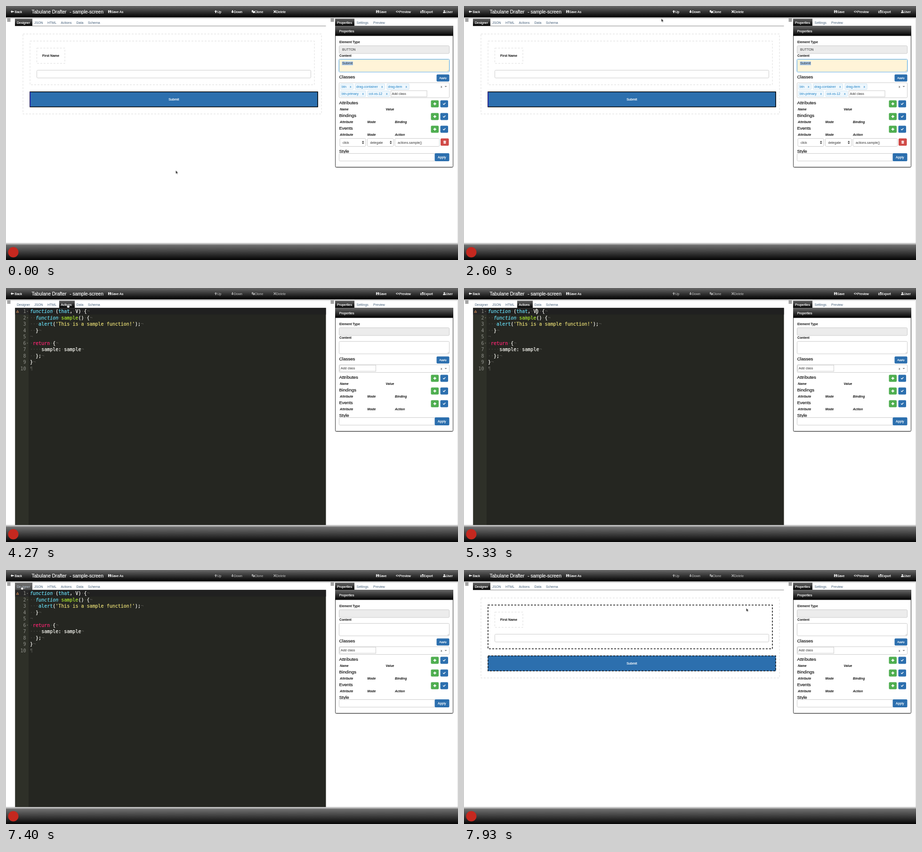
These frames come from a looping animation (960 px wide and 540 px high, 8000 ms). An HTML page:

```html
<!DOCTYPE html>
<html lang="en">
<head>
<meta charset="utf-8">
<title>Screen designer</title>
<style>
html, body { margin: 0; width: 100%; height: 100%; overflow: hidden; background: #fff; }
svg { display: block; position: absolute; left: 0; top: 0; }
text { font: 7px "Liberation Sans", Arial, sans-serif; fill: #333; white-space: pre; }
.light { fill: #fff; stroke: #fff; stroke-width: .2px; }
.link { fill: #46607a; }
.bold { font-weight: bold; fill: #111; }
.col { font-weight: bold; font-style: italic; font-size: 6.8px; fill: #111; }
.head { font-size: 9.5px; fill: #111; stroke: #111; stroke-width: .2px; }
.tag { fill: #1a7fc4; font-size: 7.1px; }
.field { fill: #fff; stroke: #ccc; }
.dash { fill: none; stroke: #dcdcdc; stroke-dasharray: 4 3; }
.dark { fill: none; stroke: #111; stroke-width: 1.5px; stroke-dasharray: 4 3; }
.code { --ink: #f8f8f2; }
.code text { font: 10px "DejaVu Sans Mono", monospace; }
.code text, .code tspan { fill: var(--ink); stroke: var(--ink); stroke-width: .25px; }
.code .num { --ink: #8f908a; stroke: none; }
.code .dim { --ink: #52524d; font-style: normal; stroke: none; }
.code .key { --ink: #66d9ef; font-style: italic; }
.code .fn { --ink: #66d9ef; }
.code .name { --ink: #a6e22e; }
.code .str { --ink: #e6db74; }
.code .ret { --ink: #f92672; }

/* One loop is 8 s, so 1% is 80 ms */
.step { animation: 8s step-end infinite; }
.before { animation-name: before; }
.after { animation-name: after; }
.designer { animation-name: designer; }
.editor { animation-name: editor; }
.last { animation-name: last; }
.tab-designer { animation-name: tab-designer; }
.tab-actions { animation-name: tab-actions; }
.tools { animation-name: tools; }
.picked { animation-name: picked; }
.hover-inner { animation-name: hover-inner; }
.hover-outer { animation-name: hover-outer; }
.hover-actions { animation-name: hover-actions; }
.hover-designer { animation-name: hover-designer; }
.caret { animation-name: caret; }
.arrow { animation-name: arrow; }
.beam { animation-name: beam; }
.hand { animation-name: hand; }
.mouse { animation: mouse 8s linear infinite; }

@keyframes before { 0% { opacity: 1 } 53.375%, 100% { opacity: 0 } }
@keyframes after { 0% { opacity: 0 } 53.375%, 100% { opacity: 1 } }
@keyframes designer { 0%, 93.375%, 100% { opacity: 1 } 53.375% { opacity: 0 } }
@keyframes editor { 0%, 93.375%, 100% { opacity: 0 } 53.375% { opacity: 1 } }
@keyframes last { 0% { opacity: 0 } 93.375%, 100% { opacity: 1 } }
@keyframes tab-designer { 0%, 93.375%, 100% { opacity: 1 } 53.375% { opacity: 0 } 91.625% { opacity: .5 } }
@keyframes tab-actions { 0%, 91.625%, 100% { opacity: 0 } 53.375% { opacity: 1 } }
@keyframes tools { 0% { opacity: 1 } 53.375%, 100% { opacity: .55 } }
@keyframes picked { 0% { opacity: 1 } 38.375%, 100% { opacity: 0 } }
@keyframes hover-inner { 0%, 29.9% { opacity: 0 } 23.75%, 98.4%, 100% { opacity: 1 } }
@keyframes hover-outer { 0%, 30.6%, 98.4%, 100% { opacity: 0 } 29.9%, 97.1% { opacity: 1 } }
@keyframes hover-actions { 0%, 53.375%, 100% { opacity: 0 } 43.5% { opacity: 1 } }
@keyframes hover-designer { 0%, 93.375%, 100% { opacity: 0 } 89.5% { opacity: 1 } }
@keyframes caret {
  0%, 60.375%, 72.875%, 85.375%, 100% { opacity: 0 }
  54.125%, 66.625%, 79.125% { opacity: 1 }
}
@keyframes arrow { 0%, 20.4%, 95.3%, 100% { opacity: 1 } 10.8%, 43.5% { opacity: 0 } }
@keyframes beam { 0%, 20.4%, 89.5%, 100% { opacity: 0 } 10.8%, 59.5% { opacity: 1 } }
@keyframes hand { 0%, 59.5%, 95.3%, 100% { opacity: 0 } 43.5%, 89.5% { opacity: 1 } }
@keyframes mouse {
  0%, 2.8% { transform: translate(360.5px, 349.5px); animation-timing-function: ease-in-out }
  11.6%, 12.6% { transform: translate(846px, 296px) }
  17.5%, 20% { transform: translate(872px, 296px); animation-timing-function: ease-in-out }
  24.1%, 26.9% { transform: translate(640px, 130px) }
  32.5% { transform: translate(419.5px, 26.5px) }
  37.5% { transform: translate(250px, 30px); animation-timing-function: ease-out }
  44.1%, 45.6% { transform: translate(139px, 37px) }
  49.1%, 57.5% { transform: translate(131px, 36px) }
  66.6%, 68.1% { transform: translate(131px, 63px) }
  75.9%, 77.5% { transform: translate(150px, 64px) }
  79.1%, 80.6% { transform: translate(160px, 76px) }
  90.9%, 95% { transform: translate(33px, 36px) }
  99.1%, 100% { transform: translate(599.5px, 81px) }
}
</style>
</head>
<body>
<svg id="stage" width="960" height="540" xmlns="http://www.w3.org/2000/svg"></svg>
<script>
const BLUE = '#2c6fae', GREEN = '#4fae50', RED = '#d04a47';

const ICONS = {
  back: 'M0 3L3 0V2H6.5V4H3V6Z',
  up: 'M3 0L6 3H4V6H2V3H0Z',
  down: 'M3 6L0 3H2V0H4V3H6Z',
  save: 'M0 0H5L6 1V6H0ZM1.5 .6V2H4V.6ZM1.3 3.5V5.5H4.7V3.5Z',
  clone: 'M0 0H3V1.4H2V4.5H0ZM2.5 1.8H6V6H2.5Z',
  cross: 'M1 0L3 2 5 0 6 1 4 3 6 5 5 6 3 4 1 6 0 5 2 3 0 1Z',
  eye: 'M0 3Q3.3 -.8 6.6 3Q3.3 6.8 0 3ZM3.3 1.5a1.5 1.5 0 1 0 .01 0Z',
  out: 'M0 1.5H2V2.3H1V5.2H5V4H6V6H0ZM3 0H6.3V3.3L5.2 2.2 3 4.4 2 3.4 4.1 1.1Z',
  user: 'M3 0a1.5 1.7 0 1 1 -.01 0ZM0 6Q0 3.6 2 3.5L3 4 4 3.5Q6 3.6 6 6Z',
  plus: 'M2 0H4V2H6V4H4V6H2V4H0V2H2Z',
  check: 'M0 3.2L1 2.2 2.3 3.4 5 .6 6 1.6 2.3 5.4Z',
  trash: 'M0 .6H2V0H4V.6H6V1.4H0ZM.6 1.8H5.4V6.6H.6ZM1.7 2.5V6H2.2V2.5ZM3.8 2.5V6H4.3V2.5Z'
};

const text = (x, y, s, cls = '', more = '') => `<text x="${x}" y="${y}" class="${cls}" ${more}>${s}</text>`;
const box = (x, y, x2, y2, more = '') => `<rect x="${x}" y="${y}" width="${x2 - x}" height="${y2 - y}" ${more}/>`;
const field = (x, y, x2, y2, more = '') => box(x, y, x2, y2, `rx="2" class="field" ${more}`);
const icon = (name, x, y, fill = '#fff') =>
  `<path d="${ICONS[name]}" transform="translate(${x} ${y})" fill="${fill}" fill-rule="evenodd"/>`;
const group = (cls, ...parts) => `<g class="${cls}">${parts.join('')}</g>`;
const step = (cls, ...parts) => group('step ' + cls, ...parts);
const shift = (dy, s) => `<g transform="translate(0 ${dy})">${s}</g>`;
const tool = (name, x, label, tx) => icon(name, x, 9) + text(tx, 14.5, label, 'light');
const button = (x, y, x2, y2, fill, mark) =>
  box(x, y, x2, y2, `rx="2" fill="${fill}"`) + icon(mark, (x + x2) / 2 - 3, (y + y2) / 2 - 3);
const grip = x => [26.5, 28.4, 30.3, 32.2].map(y => box(x, y, x + 7, y + 1, 'fill="#555"')).join('');
const tab = (x, x2, tx, label) => box(x, 27, x2, 42, 'fill="url(#bar)"') + text(tx, 37.5, label, 'light');
const down = (x, y) => `<path d="M${x} ${y}h5l-2.5 2.8z" fill="#888"/>`;

function defs() {
  const ramp = (id, ...stops) => `<linearGradient id="${id}" x2="0" y2="1">` +
    stops.map(([at, c, o = 1]) => `<stop offset="${at}" stop-color="${c}" stop-opacity="${o}"/>`).join('') +
    '</linearGradient>';
  return '<defs>' + ramp('bar', [0, '#686868'], [1, '#000']) +
    ramp('foot', [0, '#707070'], [1, '#050505']) +
    ramp('over', [0, '#7c7c7c'], [1, '#999']) +
    ramp('rise', [0, '#777', 0], [1, '#777', .9]) +
    ramp('fall', [0, '#777', .6], [1, '#777', 0]) + '</defs>';
}

function toolbar() {
  return box(0, 24, 960, 28, 'fill="url(#fall)"') + box(0, 0, 960, 24, 'fill="url(#bar)"') +
    box(959, 28, 960, 504, 'fill="#ddd"') +
    tool('back', 10, 'Back', 18.5) +
    text(54.5, 15.5, 'Tabulane Drafter', 'light', 'style="font-size:10px"') +
    text(207, 15.5, '- sample-screen', 'light', 'style="font-size:10px" text-anchor="end"') +
    tool('save', 217, 'Save As', 223.5) +
    step('tools', tool('up', 442.5, 'Up', 448.5), tool('down', 478, 'Down', 484),
      tool('clone', 522, 'Clone', 528), tool('cross', 568, 'Delete', 574)) +
    tool('save', 786, 'Save', 792.5) + tool('eye', 828, 'Preview', 835) +
    tool('out', 880, 'Export', 886.5) + tool('user', 928, 'User', 934);
}

function tabs() {
  const names = [[23, 'Designer'], [60, 'JSON'], [88, 'HTML'], [116.5, 'Actions'], [149.5, 'Data'], [174, 'Schema']];
  return grip(2.5) + grip(689.5) +
    box(19, 42, 679.5, 43, 'fill="#888"') +
    step('hover-actions', box(113, 27, 146, 42, 'fill="url(#over)"')) +
    step('hover-designer', box(19, 27, 56, 42, 'fill="url(#over)"')) +
    names.map(([x, s]) => text(x, 37.5, s, 'link')).join('') +
    step('tab-designer', tab(19, 56, 23, 'Designer')) +
    step('tab-actions', tab(113, 146, 116.5, 'Actions'));
}

function designer() {
  const dashed = (cls, ...r) => box(...r, `class="${cls}"`);
  const outer = [36, 59.5, 670, 229.5], inner = [51, 74.5, 655, 167.5], submit = [51, 182.5, 662, 214.5];
  return step('designer',
    dashed('dash', ...outer), dashed('dash', ...inner), dashed('dash', 65.5, 89.5, 125, 122),
    step('hover-outer', dashed('dark', ...outer)),
    step('hover-inner', dashed('dark', ...inner)),
    text(77, 108, 'First Name', 'bold'),
    field(65.5, 136.5, 647.5, 153),
    box(50.5, 182, 662.5, 215, `rx="1" fill="${BLUE}"`),
    step('before', box(...submit, 'fill="none" stroke="#000" stroke-width="1.5"'),
      '<path d="M51.5 183V214" stroke="#3a2cff" stroke-width="1.5" stroke-dasharray="2 1"/>'),
    step('last', dashed('dark', ...submit)),
    text(356.5, 201, 'Submit', 'light', 'text-anchor="middle" style="font-size:7.2px"'));
}

function editor() {
  const tok = (cls, s) => `<tspan class="${cls}">${s.replace(/ /g, '<tspan class="dim">·</tspan>')}</tspan>`;
  const w = s => tok('', s);
  const lines = [
    tok('key', 'function') + w(' (') + tok('fn', 'that') + w(', V) {'),
    w('  ') + tok('key', 'function') + w(' ') + tok('name', 'sample') + w('() {'),
    w('   ') + tok('fn', 'alert') + w('(') + tok('str', "'This is a sample function!'") + w(');'),
    w('  }'), '',
    w(' ') + tok('ret', 'return') + w(' {'),
    w('    sample: sample'), w('  };'), w('}'), ''
  ];
  const rows = lines.map((line, i) => {
    const y = 53.3 + i * 13.5;
    return text(42.5, y, i + 1, 'num', 'text-anchor="end"') +
      text(51, y, line + tok('dim', i < 9 ? '¬' : '¶'));
  });
  const folds = [0, 1, 5].map(i => `<path d="M44 ${49 + i * 13.5}h3l-1.5 2z" fill="#77786f"/>`);
  return step('editor code',
    box(19.5, 42.5, 679.5, 504, 'fill="#252621"'), box(19.5, 42.5, 48, 504, 'fill="#2e3028"'),
    box(19.5, 42.5, 48, 56.5, 'fill="#272727"'), box(48, 42.5, 679.5, 56.5, 'fill="#202020"'),
    '<path d="M24.5 47.5L27 52H22Z" fill="#5a3a20" stroke="#d99a6a" stroke-width=".8"/>',
    ...folds, ...rows,
    step('caret', box(153.6, 44, 154.8, 56, 'fill="#f8f8f0"')));
}

// Section title with its add and confirm buttons and the column names
function section(y, title, cols) {
  return text(707.5, y, title, 'head') +
    button(902.5, y - 8.5, 919, y + 6.5, GREEN, 'plus') + button(922.5, y - 8.5, 939, y + 6.5, BLUE, 'check') +
    cols.map(([x, s]) => text(x, y + 13.2, s, 'col')).join('');
}

function sections() {
  const cols = last => [[709, 'Attribute'], [767.5, 'Mode'], [826, last]];
  return section(209, 'Attributes', [[709, 'Name'], [806.5, 'Value']]) +
    section(236, 'Bindings', cols('Binding')) + section(263, 'Events', cols('Action'));
}

const style = () => text(707.5, 311.5, 'Style', 'head') + field(707.5, 313.5, 912, 329.5) +
  box(910.5, 313, 941.5, 330, `rx="2" fill="${BLUE}"`) + text(917, 324.3, 'Apply', 'light');

const addClass = (x, y) => box(x, y, x + 76.5, y + 13, 'fill="#fff" stroke="#ccc"') + text(x + 2, y + 8.8, 'Add class');
const clear = () => text(923, 174.3, 'x') + down(931.5, 170);

function select(x, x2, label) {
  return field(x, 281.5, x2, 298.5) + text(x + 6, 292.5, label) +
    `<path d="M${x2 - 8} 289.3h4.4l-2.2 -2.8zM${x2 - 8} 290.8h4.4l-2.2 2.8z" fill="#333"/>`;
}

function tag([x, y, x2, s]) {
  return box(x, y, x2, y + 12, 'rx="1" fill="#eef7fd" stroke="#c4e0f0" stroke-width=".8"') +
    text(x + 2.5, y + 8.6, s, 'tag') + text(x2 - 7.5, y + 8.6, 'x', 'tag');
}

function filled() {
  const tags = [[710.5, 165.5, 737.5, 'btn'], [741.5, 165.5, 804.5, 'drag-container'], [809, 165.5, 856, 'drag-item'],
    [710.5, 180.5, 764, 'btn-primary'], [768, 180.5, 814.5, 'col-xs-12']];
  return text(714, 95, 'BUTTON') +
    box(707, 113, 942, 140.5, 'rx="2.5" fill="none" stroke="#cfe6f8" stroke-width="2"') +
    field(707.5, 113.5, 941.5, 140, 'style="stroke:#66afe0"') +
    step('picked', box(708, 114, 941, 139.5, 'fill="#fff4d8"'), box(713.5, 118, 737, 126, 'fill="#a9c7e6"')) +
    text(714, 124.3, 'Submit', '', 'style="font-size:7.2px"') +
    field(707.5, 163, 941.5, 195) + tags.map(tag).join('') + addClass(817.5, 180) + clear() +
    sections() + select(709, 764, 'click') + select(767.5, 823, 'delegate') +
    field(826, 281.5, 920.5, 298.5) + text(832, 292.5, 'actions.sample()') +
    button(923, 281.5, 940.5, 297, RED, 'trash') + style();
}

function blank() {
  return field(707.5, 113.5, 941.5, 140) + field(707.5, 163, 941.5, 179.5) + addClass(709, 164) + clear() +
    shift(-16, sections()) + shift(-38, style());
}

function panel() {
  const frame = y2 => box(699.5, 43.5, 949.5, y2 + 1, 'rx="2" fill="none" stroke="#bbb"') +
    box(699.5, 42.5, 949.5, y2, 'rx="2" fill="#fff" stroke="#333"');
  return tab(699, 740, 703, 'Properties') + text(744.5, 37.5, 'Settings', 'link') + text(780, 37.5, 'Preview', 'link') +
    step('before', frame(342.5)) + step('after', frame(304.5)) +
    box(699, 42, 950, 63.5, 'fill="url(#bar)"') + text(707.5, 56, 'Properties', 'light') +
    text(708, 79, 'Element Type', 'bold', 'style="font-size:6.8px"') +
    field(707.5, 84.5, 941.5, 101, 'style="fill:#ececec"') +
    text(708, 108.3, 'Content', 'bold', 'style="font-size:6.8px"') +
    text(707.5, 153.5, 'Classes', 'head') +
    box(914.5, 145.5, 941.5, 160.5, `rx="2" fill="${BLUE}"`) +
    text(928, 155.3, 'Apply', 'light', 'text-anchor="middle" style="font-size:6.2px"') +
    step('before', filled()) + step('after', blank()) +
    '<path d="M937.5 139L940.5 136M939.3 139L940.5 137.8" stroke="#999" stroke-width=".6"/>';
}

function footer() {
  return box(0, 502.5, 960, 508, 'fill="url(#rise)"') + box(0, 508, 960, 540, 'fill="url(#foot)"') +
    '<circle cx="15.5" cy="523.5" r="11" fill="#c5281f"/>';
}

function mouse() {
  return group('mouse',
    step('arrow', '<path d="M0 0V7.2L1.7 5.7 2.8 8.2 4 7.7 2.9 5.3H5Z" fill="#222" stroke="#fff" stroke-width=".5"/>'),
    step('beam', '<path d="M-1.6 -4Q0 -4 0 -3V3Q0 4 -1.6 4M1.6 -4Q0 -4 0 -3M0 3Q0 4 1.6 4" fill="none" stroke="#555" stroke-width=".9"/>'),
    step('hand', '<path d="M-.8 -2H.5V1H4V4L3.2 6H-.2L-2.2 3 -1.6 2.2 -.8 3Z" fill="#fff" stroke="#222" stroke-width=".6"/>'));
}

document.getElementById('stage').innerHTML =
  defs() + toolbar() + tabs() + designer() + editor() + panel() + footer() + mouse();
</script>
</body>
</html>
```
